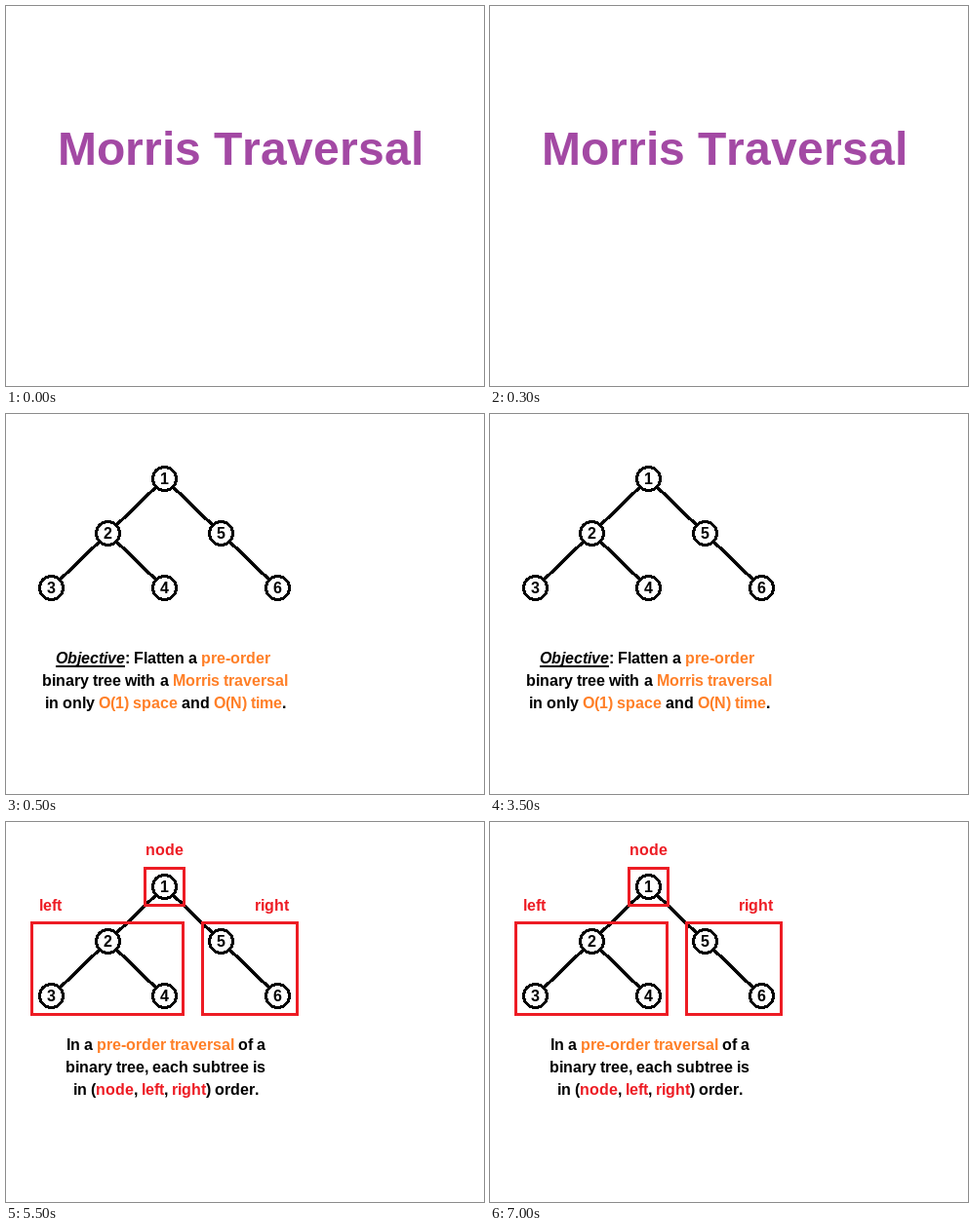
Animation of 490x390 px, one loop 8 s. Source, as an HTML page:

```html
<!DOCTYPE html>
<html lang="en">
<head>
<meta charset="utf-8">
<title>Morris Traversal</title>
<style>
  html, body { margin: 0; width: 100%; height: 100%; overflow: hidden; background: #fff; }
  svg { display: block; }
  text { font: bold 16px "Liberation Sans", Arial, sans-serif; font-kerning: none; white-space: pre; }
  #title text { font-size: 48px; fill: #a349a4; }
  .orange { fill: #ff7f27; }
  .red { fill: #ed1c24; }
  .italic { font-style: italic; }
  .edges { stroke: #000; stroke-width: 3.5; shape-rendering: crispEdges; }
  .nodes circle { fill: #fff; stroke: #000; stroke-width: 3; shape-rendering: crispEdges; }
  .boxes rect { fill: none; stroke: #ed1c24; stroke-width: 3; }

  .scene { visibility: hidden; animation: 8s step-end infinite; }
  #title { animation-name: title; }
  #tree { animation-name: tree; }
  #objective { animation-name: objective; }
  #order { animation-name: order; }
  @keyframes title { 0% { visibility: visible; } 6.25%, 100% { visibility: hidden; } }
  @keyframes tree { 0% { visibility: hidden; } 6.25%, 100% { visibility: visible; } }
  @keyframes objective { 0%, 68.75%, 100% { visibility: hidden; } 6.25% { visibility: visible; } }
  @keyframes order { 0% { visibility: hidden; } 68.75%, 100% { visibility: visible; } }
</style>
</head>
<body>
<svg width="490" height="390" viewBox="0 0 490 390">
  <g id="title" class="scene"></g>
  <g id="tree" class="scene">
    <g class="edges"></g>
    <g class="nodes"></g>
  </g>
  <g id="objective" class="scene">
    <rect x="51" y="258" width="71" height="2"/>
  </g>
  <g id="order" class="scene">
    <g class="boxes">
      <rect x="142.5" y="47.5" width="40" height="38"/>
      <rect x="26.5" y="103.5" width="155" height="94"/>
      <rect x="201.5" y="103.5" width="97" height="94"/>
    </g>
  </g>
</svg>
<script>
const $ = selector => document.querySelector(selector);
const pen = document.createElement('canvas').getContext('2d');

function add(parent, tag, attrs, content = '') {
  const el = document.createElementNS('http://www.w3.org/2000/svg', tag);
  for (const key in attrs) el.setAttribute(key, attrs[key]);
  el.textContent = content;
  return parent.appendChild(el);
}

// Each run is a string or [string, class]; letters advance by whole pixels.
function write(parent, x, y, ...runs) {
  const line = add(parent, 'text', { y });
  pen.font = `bold ${getComputedStyle(line).fontSize} "Liberation Sans", Arial, sans-serif`;
  for (const run of runs) {
    const [string, style = ''] = [run].flat();
    const stops = [...string].map(letter => {
      const start = x;
      x += Math.round(pen.measureText(letter).width);
      return start;
    });
    add(line, 'tspan', { x: stops.join(' '), class: style }, string);
  }
}

const nodes = [[162.5, 66.5], [104.5, 122.5], [46.5, 178.5], [162.5, 178.5], [220.5, 122.5], [278.5, 178.5]];
const edges = [[1, 2], [2, 3], [2, 4], [1, 5], [5, 6]];
for (const [from, to] of edges) {
  const [x1, y1] = nodes[from - 1], [x2, y2] = nodes[to - 1];
  add($('.edges'), 'line', { x1, y1, x2, y2 });
}
nodes.forEach(([cx, cy], i) => {
  add($('.nodes'), 'circle', { cx, cy, r: 12 });
  write($('.nodes'), cx - 4.5, cy + 5.5, `${i + 1}`);
});

write($('#title'), 53, 163, 'Morris Traversal');

const objective = $('#objective');
write(objective, 51, 256, ['Objective', 'italic'], ': Flatten a ', ['pre-order', 'orange']);
write(objective, 37, 279, 'binary tree with');
write(objective, 158, 279, 'a ', ['Morris traversal', 'orange']);
write(objective, 40, 302, 'in only ', ['O(1) space', 'orange'], ' and ', ['O(N) time', 'orange'], '.');

const order = $('#order');
write(order, 143, 34, ['node', 'red']);
write(order, 34, 91, ['left', 'red']);
write(order, 255, 91, ['right', 'red']);
write(order, 62, 234, 'In a ', ['pre-order traversal', 'orange'], ' of a');
write(order, 61, 257, 'binary tree, each subtree is');
write(order, 69, 280, 'in (', ['node', 'red'], ', ', ['left', 'red'], ', ', ['right', 'red'], ') order.');
</script>
</body>
</html>
```
